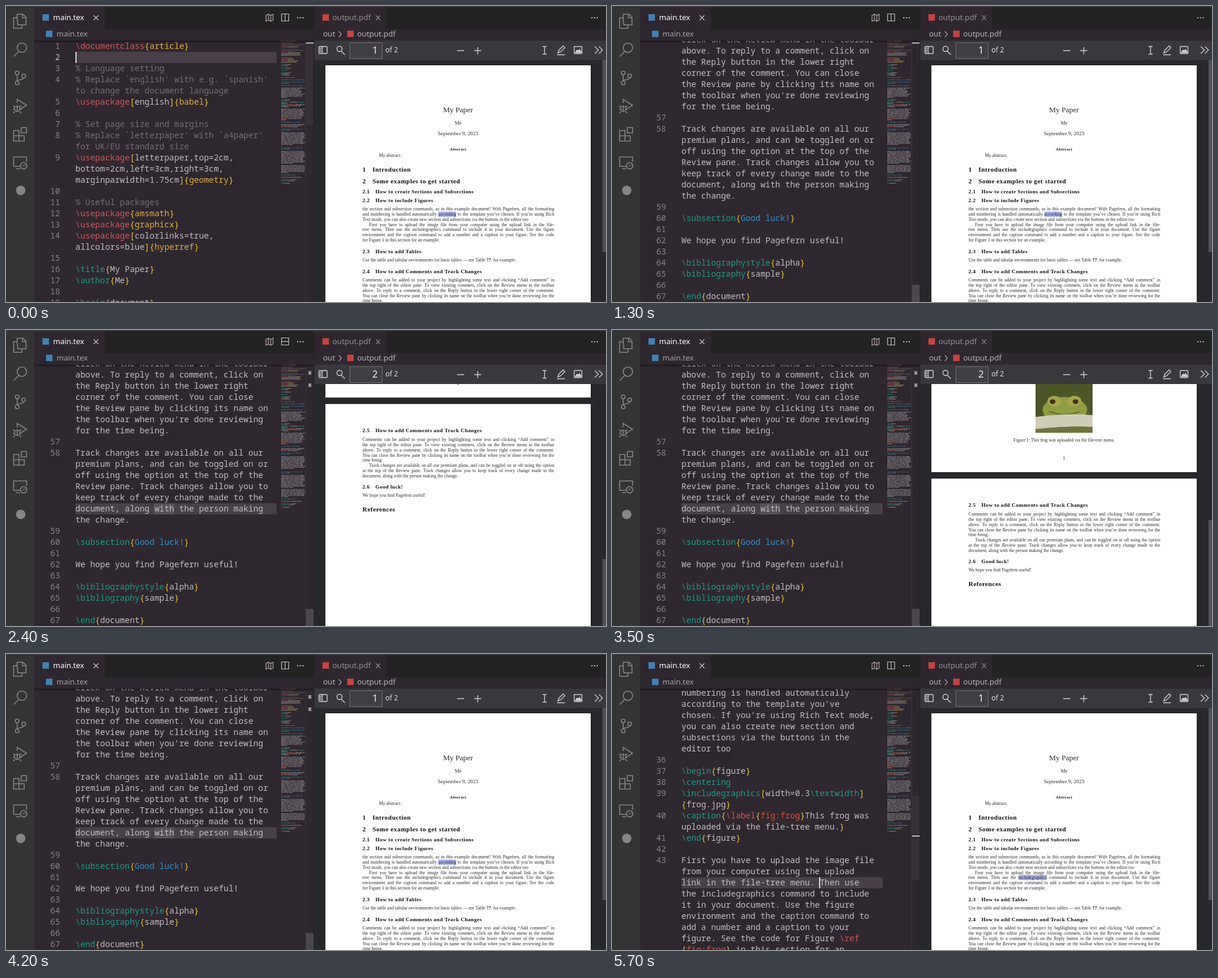
Animation, 1020 px wide and 504 px high, one loop 5.8 s. Source, as an HTML page with a canvas:

```html
<!DOCTYPE html>
<html lang="en">
<head>
<meta charset="utf-8">
<title>LaTeX editor with PDF preview</title>
<style>
html, body { margin: 0; width: 100%; height: 100%; overflow: hidden; background: #2f272f; }
#stage { position: relative; width: 1020px; height: 504px; overflow: hidden; background: #2f272f;
  font: 13px "Noto Sans", "Open Sans", sans-serif; color: #b8b8b8; }
#stage div, #stage svg, #stage canvas { position: absolute; }
.label { white-space: nowrap; line-height: 20px; height: 20px; }
#editor { left: 48px; top: 59px; width: 475px; height: 445px; overflow: hidden; }
#code { left: 0; top: 0; width: 412px; font: 14px "Noto Sans Mono", monospace; }
#code .row, #code .num { margin-top: -1px; height: 19px; line-height: 19px; white-space: pre; }
#code .row { left: 70px; }
#code .num { left: 0; width: 44px; text-align: right; color: #858585; }
#code .num.first { color: #c6c6c6; }
#lineMark { left: 70px; width: 342px; height: 19px; background: #483f48; }
#wordMark { left: 204px; width: 34px; height: 19px; background: #575257; }
#caret { width: 2px; height: 19px; background: #d8d8d8; }
#viewer { left: 524px; top: 92px; width: 496px; height: 412px; overflow: hidden; background: #27282b; }
#pages { left: -524px; top: -92px; width: 1020px; height: 1300px; font-family: "Liberation Serif", serif; color: #2a2a2a; }
.sheet { left: 543px; width: 451px; height: 584px; background: #fff; }
.t { height: 10px; line-height: 10px; font-size: 7.7px; white-space: nowrap; }
.just { white-space: normal; text-align: justify; text-align-last: justify; }
.mid { left: 543px; width: 451px; text-align: center; }
.h1, .h2, .bold { font-weight: bold; letter-spacing: .042em; color: #111; }
.h1, .h2 { margin-top: -1px; }
.h1 { font-size: 11px; }
.h2 { font-size: 9.1px; }
.picked { background: #abb2f2; }
</style>
</head>
<body>
<div id="stage">
  <div style="left:0;top:0;width:48px;height:504px;background:#333433"></div>
  <div style="left:48px;top:0;width:972px;height:39px;background:#232323"></div>
  <div style="left:48px;top:2px;width:120px;height:37px;background:#2f272f"></div>
  <div style="left:524px;top:2px;width:122px;height:37px;background:#2f272f"></div>
  <div style="left:0;top:0;width:1020px;height:2px;background:#383838"></div>
  <div id="editor">
    <div id="code"><div id="lineMark"></div><div id="wordMark"></div></div>
    <canvas id="minimap" width="44" height="445" style="left:420px;top:0"></canvas>
    <div style="left:461px;top:0;width:1px;height:445px;background:#3d353d"></div>
    <div id="slider" style="left:462px;width:13px;height:143px;background:rgba(121,121,121,.4)"></div>
    <div id="rulerMark" style="left:462px;width:13px;height:2px;background:#bcbcbc"></div>
    <div id="matches">
      <div style="left:466px;top:11px;width:5px;height:6px;background:#989398"></div>
      <div style="left:466px;top:32px;width:5px;height:6px;background:#989398"></div>
    </div>
    <div style="left:0;top:0;width:475px;height:4px;background:linear-gradient(rgba(0,0,0,.45),transparent)"></div>
  </div>
  <div style="left:523px;top:0;width:1px;height:504px;background:#202020"></div>
  <div style="left:524px;top:59px;width:496px;height:33px;background:#38383d;box-shadow:0 1px #1b1b1d"></div>
  <div id="viewer"><div id="pages"></div>
    <div id="thumb" style="left:490px;width:6px;height:327px;background:#505154"></div>
  </div>
  <div style="left:584px;top:62px;width:54px;height:26px;border:1px solid #737373;background:#404044"></div>
  <svg id="icons" width="1020" height="504" viewBox="0 0 1020 504" fill="none" stroke="#868686" stroke-width="1.6">
    <path d="M19 20V14h10l5 5v13H20zM28 14v6h6M19 20h-6v18h14v-6"/>
    <path d="M22 77L13 86"/><circle cx="27" cy="71" r="8"/>
    <circle cx="19" cy="114" r="3.2"/><circle cx="19" cy="131" r="3.2"/><circle cx="30" cy="119" r="3.2"/>
    <path d="M19 117v11M30 122c0 5-10 2-11 6"/>
    <path d="M19 165V159l16 10-11 7"/><circle cx="19" cy="175" r="4.5"/>
    <path d="M19 170v10M12 170l3 2M12 176h3M12 182l3-2M26 170l-3 2M26 176h-3M26 182l-3-2"/>
    <path d="M13 212h9v9h9v9H13zM22 221h-9M22 221v9M26 207h9v9h-9z"/>
    <path d="M24 273H13v-16h22v8M17 277h7"/><circle cx="30" cy="272" r="5.5"/><path d="M28 270l2 2-2 2M33 269l-2 2 2 2" stroke-width="1"/>
    <circle cx="25" cy="314" r="8" fill="#868686" stroke="none"/>
    <g stroke="none"><path fill="#3f82b5" d="M62 14h11v11H62zM68 42h11v11H68z"/><path fill="#c5443f" d="M538 14h11v11h-11zM580 42h11v11h-11z"/></g>
    <g stroke="#c4c4c4" stroke-width="1.2">
      <path d="M149 16l8 8M157 16l-8 8"/>
      <path d="M442 16l4-2 4 2 4-2v10l-4 2-4-2-4 2zM446 14v10M450 16v10" stroke="#b6a4b0"/>
      <path d="M468.500 13.500h12v12h-12z"/><path id="split" d="M474.500 13.500v12"/>
      <path d="M495 20h2M499.500 20h2M504 20h2M995 20h2M999.500 20h2M1004 20h2" stroke-width="2"/>
      <path d="M629 16l7 8M636 16l-7 8" stroke="#858585"/>
      <path d="M566 43l4 5-4 5"/>
    </g>
    <g stroke="#d0d0d2" stroke-width="1.4">
      <rect x="532" y="69" width="14" height="12" rx="1.500"/><path d="M537.500 69v12M533 72h3M533 75h3M533 78h3"/>
      <circle cx="567" cy="73" r="4.500"/><path d="M570 77l6 6"/>
      <path d="M767 76h12M796 76h12M802 70v12M912 69h7M912 82h7M915.500 69v13"/>
      <path d="M938 80l2-5 7-7 3 3-7 7zM937 83h13"/>
      <rect x="966" y="69" width="13" height="12" rx="1"/><path fill="#d0d0d2" d="M968 79l3-4 2 2 2-3 3 5z"/>
      <path d="M1001 69l6 6-6 6M1008 69l6 6-6 6"/>
    </g>
  </svg>
  <div class="label" style="left:80px;top:9px;color:#fff">main.tex</div>
  <div class="label" style="left:86px;top:37px;color:#a5a5a5">main.tex</div>
  <div class="label" style="left:555px;top:9px;color:#969196">output.pdf</div>
  <div class="label" style="left:539px;top:37px">out</div>
  <div class="label" style="left:597px;top:37px">output.pdf</div>
  <div class="label" id="pageNo" style="left:590px;top:65px;width:42px;text-align:right;font-size:16px;color:#f4f4f4"></div>
  <div class="label" style="left:645px;top:65px;font-size:12px;color:#e4e4e4">of 2</div>
</div>
<script>
const $ = id => document.getElementById(id);
const ROW = 19, COLS = 39, LOOP = 5800;

const comments = "Comments can be added to your project by highlighting some text and clicking ``Add comment'' in the top right of the editor pane. To view existing commets, click on the Review menu in the toolbar above. To reply to a comment, click on the Reply button in the lower right corner of the comment. You can close the Review pane by clicking its name on the toolbar when you're done reviewing for the time being.";
const commentHead = "\\subsection{How to add Comments and Track Changes}";

// "|" forces a soft wrap inside a logical line
const source = String.raw`\documentclass{article}

% Language setting
% Replace ${"`"}english' with e.g. ${"`"}spanish' to change the document language
\usepackage[english]{babel}

% Set page size and margins
% Replace ${"`"}letterpaper' with ${"`"}a4paper' for UK/EU standard size
\usepackage[letterpaper,top=2cm,|bottom=2cm,left=3cm,right=3cm,|marginparwidth=1.75cm]{geometry}

% Useful packages
\usepackage{amsmath}
\usepackage{graphicx}
\usepackage[colorlinks=true,|allcolors=blue]{hyperref}

\title{My Paper}
\author{Me}

\begin{document}

\maketitle

\begin{abstract}
My abstract.
\end{abstract}

\section{Introduction}

\section{Some examples to get started}

\subsection{How to create Sections and Subsections}

\subsection{How to include Figures}

the section and subsection commands, as in this example document! With Pagefern, all the formatting and numbering is handled automatically according to the template you've chosen. If you're using Rich Text mode, you can also create new section and subsections via the buttons in the editor too

\begin{figure}
\centering
\includegraphics[width=0.3\textwidth]|{frog.jpg}
\caption{\label{fig:frog}This frog was uploaded via the file-tree menu.}
\end{figure}

First you have to upload the image file from your computer using the upload link in the file-tree menu. Then use the includegraphics command to include it in your document. Use the figure environment and the caption command to add a number and a caption to your figure. See the code for Figure \ref|{fig:frog} in this section for an example.

\subsection{How to add Tables}

Use the table and tabular environments for basic tables --- see Table~\ref|{tab:widgets}. for example.

${commentHead}

${comments}


${commentHead}

${comments}

Track changes are available on all our premium plans, and can be toggled on or off using the option at the top of the Review pane. Track changes allow you to keep track of every change made to the document, along with the person making the change.

\subsection{Good luck!}

We hope you find Pagefern useful!

\bibliographystyle{alpha}
\bibliography{sample}

\end{document}`;

const RULES = [
  [/[{}[\]]/g, "#f2c92e"],
  [/\\[a-z]+/g, "#1a9c8c"],
  [/\\(documentclass|usepackage|label|ref)/g, "#d0555b"],
  [/(?<=section\{)[^}]+/g, "#2b93d1"],
  [/(?<=\\(ref|label)\{)[^}]+/g, "#d5553d"],
  [/(?<=(class|package|\])\{)\w+(?=\}$)/g, "#e2ae45"],
  [/^%.*/g, "#747074"]
];

function paint(line) {
  const colors = Array(line.length).fill("#c3c0c3");
  for (const [rule, color] of RULES)
    for (const m of line.matchAll(rule)) colors.fill(color, m.index, m.index + m[0].length);
  return colors;
}

function wrap(line) {
  const rows = [];
  let offset = 0;
  for (const part of line.split("|")) {
    let start = 0;
    while (part.length - start > COLS) {
      const cut = part.lastIndexOf(" ", start + COLS);
      if (cut <= start) break;
      rows.push([offset + start, offset + cut]);
      start = cut + 1;
    }
    rows.push([offset + start, offset + part.length]);
    offset += part.length;
  }
  return rows;
}

function add(parent, cls, style, text = "") {
  const el = document.createElement("div");
  el.className = cls;
  Object.assign(el.style, style);
  el.innerHTML = text;
  return parent.appendChild(el);
}

const rowOf = [];
const mini = $("minimap").getContext("2d");
mini.globalAlpha = .55;
let rowCount = 0;
source.split("\n").forEach((raw, i) => {
  const line = raw.replaceAll("|", ""), colors = paint(line);
  rowOf[i + 1] = rowCount;
  add($("code"), i === 1 ? "num first" : "num", { top: rowCount * ROW + "px" }, i + 1);
  for (const [from, to] of wrap(raw)) {
    const row = add($("code"), "row", { top: rowCount * ROW + "px" });
    for (let a = from, b; a < to; a = b) {
      b = a + 1;
      while (b < to && colors[b] === colors[a]) b++;
      const span = row.appendChild(document.createElement("span"));
      span.style.color = colors[a];
      span.textContent = line.slice(a, b);
    }
    for (let c = from; c < to; c++) if (line[c] !== " ") {
      mini.fillStyle = colors[c];
      mini.fillRect((c - from) * 1.03, rowCount * 2, 1, 1.3);
    }
    rowCount++;
  }
});
$("code").append(Object.assign(document.createElement("div"), { id: "caret" }));

// PDF pages, placed by the vertical centre of each line
const pages = $("pages");
const put = (x, y, text, cls = "", style = {}) =>
  add(pages, "t " + cls, { left: x + "px", top: y - 5 + "px", ...style }, text);
const center = (y, size, text, cls = "") =>
  add(pages, "t mid " + cls, { top: y - 5 + "px", fontSize: size + "px" }, text);
function heading(y, number, text, cls = "h2") {
  put(606, y, number, cls);
  put(cls === "h1" ? 623 : 628, y, text, cls);
}
function paragraph(y, text, indent = 0) {
  const lines = text.split("\n");
  lines.forEach((line, i) => {
    const shift = i ? 0 : indent, last = i === lines.length - 1;
    put(606 + shift, y + i * 8.85, line, last ? "" : "just", last ? {} : { width: 326 - shift + "px" });
  });
}
const review = `Comments can be added to your project by highlighting some text and clicking “Add comment” in
the top right of the editor pane. To view existing commets, click on the Review menu in the toolbar
above. To reply to a comment, click on the Reply button in the lower right corner of the comment.
You can close the Review pane by clicking its name on the toolbar when you’re done reviewing for the
time being.`;

add(pages, "sheet", { top: "101px" });
add(pages, "sheet", { top: "696px" });
center(177, 13, "My Paper");
center(199, 8.8, "Me");
center(217, 9.2, "September 9, 2023");
center(244, 7, "Abstract", "bold");
put(634, 255, "My abstract.");
heading(279, "1", "Introduction", "h1");
heading(299, "2", "Some examples to get started", "h1");
heading(317, "2.1", "How to create Sections and Subsections");
heading(332, "2.2", "How to include Figures");
paragraph(346, `the section and subsection commands, as in this example document! With Pagefern, all the formatting
and numbering is handled automatically <span id="pickA">according</span> to the template you’ve chosen. If you’re using Rich
Text mode, you can also create new section and subsections via the buttons in the editor too`);
paragraph(372.6, `First you have to upload the image file from your computer using the upload link in the file-
tree menu. Then use the <span id="pickB">includegraphics</span> command to include it in your document. Use the figure
environment and the caption command to add a number and a caption to your figure. See the code
for Figure 1 in this section for an example.`, 11);
heading(419, "2.3", "How to add Tables");
paragraph(433, "Use the table and tabular environments for basic tables — see Table <b>??</b>. for example.");
heading(453, "2.4", "How to add Comments and Track Changes");
paragraph(467, review);
add(pages, "", { left: "720px", top: "521px", width: "97px", height: "97px" }, `
<svg width="97" height="97" viewBox="0 0 97 97">
  <rect width="97" height="97" fill="#4c5527"/>
  <ellipse cx="50" cy="58" rx="38" ry="22" fill="#8f9c42"/>
  <ellipse cx="32" cy="43" rx="12" ry="9" fill="#a3a64c"/><ellipse cx="66" cy="43" rx="12" ry="9" fill="#a3a64c"/>
  <ellipse cx="29" cy="44" rx="5" ry="4" fill="#47301d"/><ellipse cx="68" cy="44" rx="5" ry="4" fill="#47301d"/>
  <path d="M24 61q26 10 50 0" fill="none" stroke="#606d2c" stroke-width="2"/>
  <path d="M0 70q48-7 97-3v20q-45-2-97 4z" fill="#cfcdb5"/>
  <path d="M0 91q52-6 97-4v10H0z" fill="#70733d"/>
</svg>`);
center(631, 7.7, "Figure 1: This frog was uploaded via the file-tree menu.");
center(662, 7.7, "1");
heading(742, "2.5", "How to add Comments and Track Changes");
paragraph(757, review);
paragraph(801, `Track changes are available on all our premium plans, and can be toggled on or off using the option
at the top of the Review pane. Track changes allow you to keep track of every change made to the
document, along with the person making the change.`, 11);
heading(838, "2.6", "Good luck!");
paragraph(852, "We hope you find Pagefern useful!");
put(606, 875.5, "References", "h1");

// Each track is a list of [start ms, value]
const END = rowOf[57] * ROW - 122, FIGURE = rowOf[36] * ROW - 112;
const caretAt = (row, x) => ({ row, x });
const tracks = {
  scroll: [[0, 0], [300, 240], [400, 480], [900, 800], [1100, 1180], [1200, 1600], [1300, END], [4600, FIGURE]],
  slider: [[0, .25], [300, 1], [4600, .25]],
  pdf: [[0, 0], [2400, 570], [3500, 443], [3600, 370], [3700, 270], [3800, 160], [3900, 60], [4000, 0]],
  caret: [[0, caretAt(1, 70)], [1500, caretAt(rowOf[58] + 5, 222)], [4600, caretAt(rowOf[43] + 2, 304)]],
  blink: [[0, 1], [2000, 0], [2700, 1], [3200, 0], [3700, 1], [4200, 0], [4600, 1], [5100, 0], [5600, 1]],
  word: [[0, 0], [1700, 1], [4600, 0]],
  splitDown: [[0, 0], [2000, 1], [2700, 0]],
  picked: [[0, "pickA"], [4500, "pickB"]]
};
const at = (name, t) => tracks[name].findLast(step => step[0] <= t)[1];
const show = (id, on) => { $(id).style.visibility = on ? "visible" : "hidden"; };

function draw(t) {
  const scroll = at("scroll", t), pdf = at("pdf", t), { row, x } = at("caret", t), word = at("word", t);
  $("code").style.top = -scroll + "px";
  $("slider").style.top = scroll * .2222 + "px";
  $("slider").style.opacity = at("slider", t);
  $("lineMark").style.top = $("wordMark").style.top = $("caret").style.top = row * ROW + "px";
  $("caret").style.left = x + "px";
  $("rulerMark").style.top = row * 4.18 - 1 + "px";
  show("caret", at("blink", t));
  show("wordMark", word);
  show("matches", word);
  $("split").setAttribute("d", at("splitDown", t) ? "M468.5 19.5h12" : "M474.5 13.5v12");
  pages.style.top = -92 - pdf + "px";
  $("thumb").style.top = pdf * .523 + "px";
  $("pageNo").textContent = pdf > 400 ? 2 : 1;
  for (const id of ["pickA", "pickB"]) $(id).className = id === at("picked", t) ? "picked" : "";
}

const start = performance.now();
(function frame() {
  draw((performance.now() - start) % LOOP);
  requestAnimationFrame(frame);
})();
</script>
</body>
</html>
```
